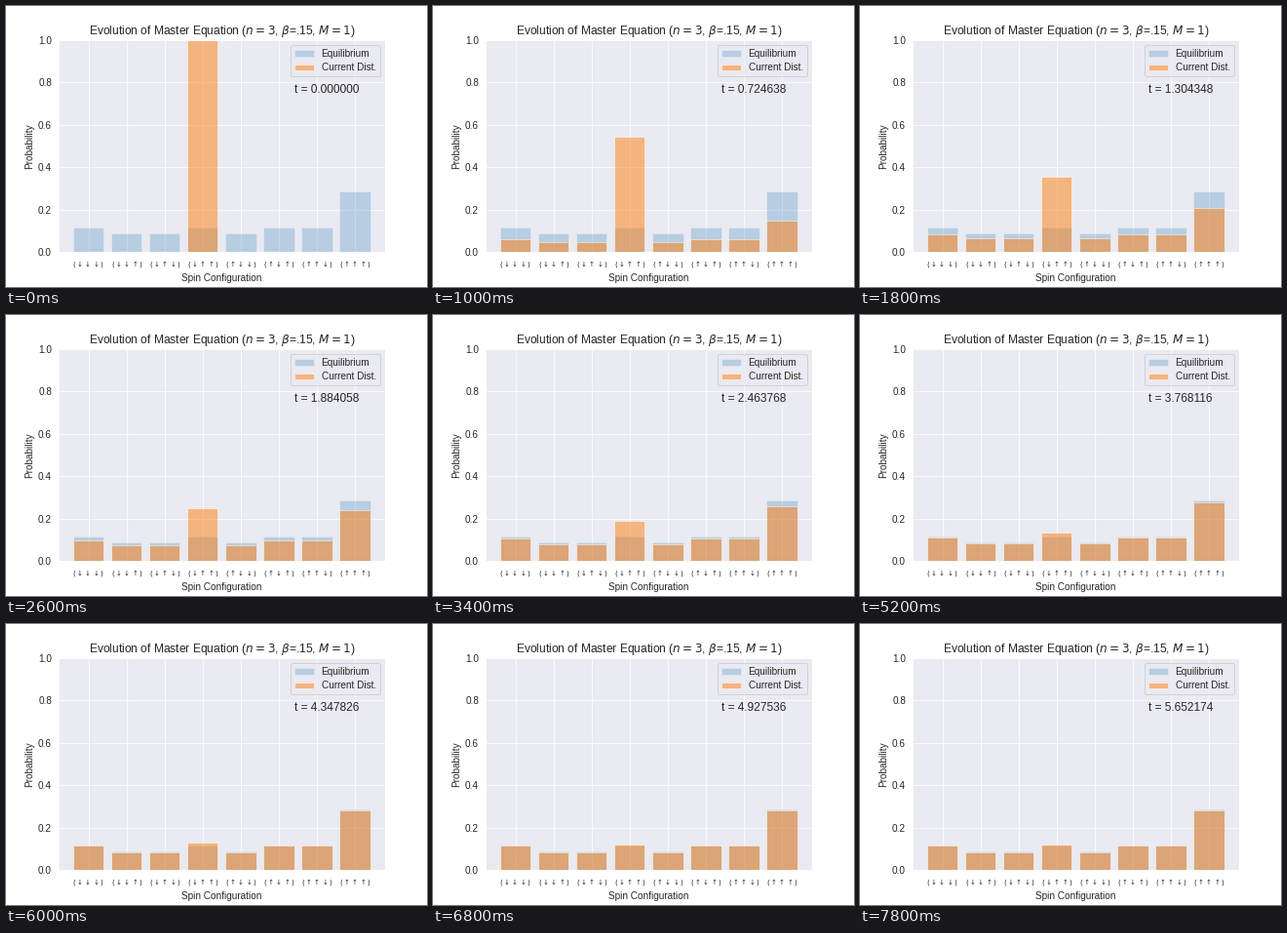
Animation of 432x288 px, one loop 8000 ms. Source, as a matplotlib script:

```python
import itertools

import matplotlib.pyplot as plt
import numpy as np
from matplotlib.animation import FuncAnimation

FRAMES, INTERVAL = 40, 200
STEP = 10 / 69      # simulated time per frame
BETA, FIELD = 0.15, 1
START = 3           # index of the initial configuration

INK, PANEL = "0.15", "#EAEAF2"
SMALL, CLOCK = 9.95, 11.82  # just below the sizes where hinting adds a pixel
plt.rcParams.update({
    "font.family": "Liberation Sans",
    "mathtext.fontset": "dejavusans",
    "text.color": INK,
    "axes.labelcolor": INK,
    "axes.labelsize": SMALL,
    "legend.fontsize": SMALL,
    "ytick.labelsize": SMALL,
    "xtick.labelsize": 7,
    "axes.titlesize": 12,
    "axes.facecolor": PANEL,
    "axes.edgecolor": "white",
    "axes.axisbelow": True,
    "axes.grid": True,
    "grid.color": "white",
    "patch.edgecolor": "white",
    "patch.force_edgecolor": True,
    "xtick.color": INK, "ytick.color": INK,
    "xtick.major.size": 0, "ytick.major.size": 0,
    "xtick.major.pad": 7, "ytick.major.pad": 7,
    "figure.subplot.bottom": 0.125,
})

states = list(itertools.product((-1, 1), repeat=3))


def weight(spins):
    """Boltzmann weight of a spin ring in an external field."""
    bonds = sum(a * b for a, b in zip(spins, spins[1:] + spins[:1]))
    return np.exp(BETA * (bonds + FIELD * sum(spins)))


def label(spins):
    arrows = "".join(r"\uparrow" if s > 0 else r"\downarrow" for s in spins)
    return f"$({arrows})$"


equilibrium = np.array([weight(s) for s in states])
equilibrium /= equilibrium.sum()
initial = np.eye(len(states))[START]
x = np.arange(len(states))

fig, ax = plt.subplots(figsize=(6, 4), dpi=72)
ax.bar(x, equilibrium, color="#1f77b4", alpha=0.25, label="Equilibrium")
bars = ax.bar(x, initial, color="#ff7f0e", alpha=0.5, label="Current Dist.")
clock = ax.text(5.4, 0.75, "", fontsize=CLOCK)

ax.set_ylim(0, 1)
ax.set_xticks(x, [label(s) for s in states])
ax.set_xlabel("Spin Configuration")
ax.set_ylabel("Probability")
ax.set_title(r"Evolution of Master Equation ($n=3$, $\beta$=.15, $M=1$)")
ax.legend(loc="upper right")


def update(frame):
    t = frame * STEP
    current = equilibrium + (initial - equilibrium) * np.exp(-t)
    for bar, height in zip(bars, current):
        bar.set_height(height)
    clock.set_text(f"t = {t:.6f}")
    return [*bars, clock]


anim = FuncAnimation(fig, update, frames=FRAMES, interval=INTERVAL,
                     init_func=lambda: update(0), repeat=True, repeat_delay=0)
plt.show()
```
